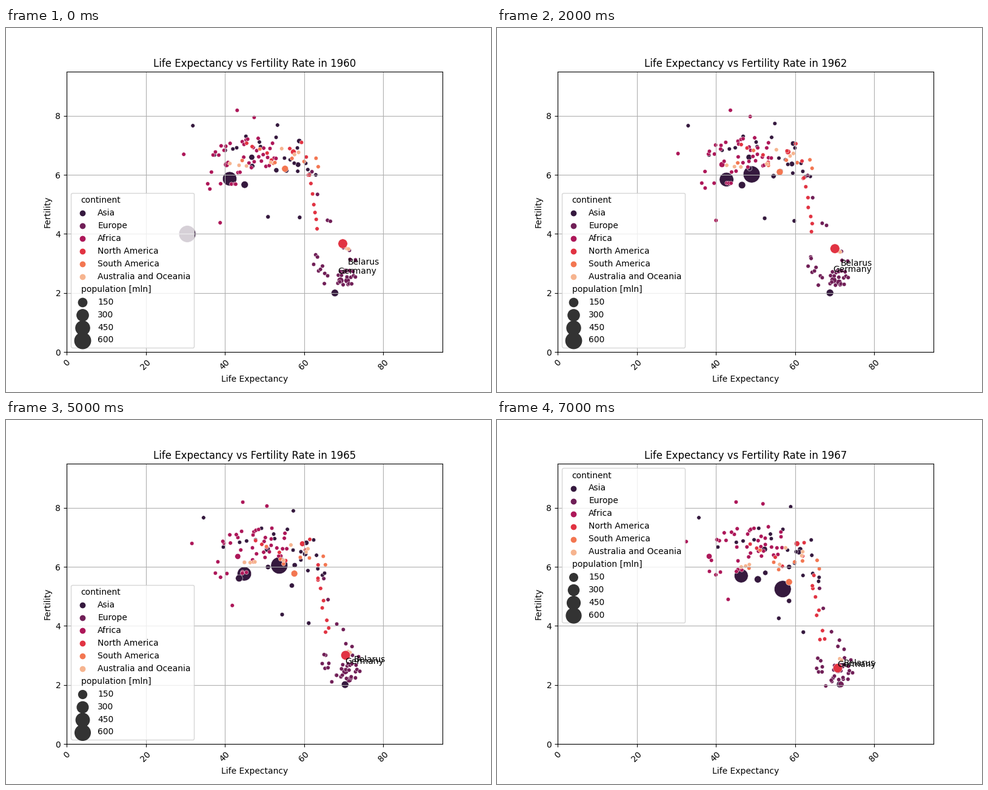
These frames come from a looping animation (800x600 px, 8000 ms). A matplotlib script:

```python
import numpy as np
import matplotlib.pyplot as plt
from matplotlib.animation import FuncAnimation
from matplotlib.offsetbox import VPacker

YEARS = 8
SMALL_POP = 4
COLORS = {
    "Asia": "#35193e",
    "Europe": "#701f57",
    "Africa": "#ad1759",
    "North America": "#e13342",
    "South America": "#f37651",
    "Australia and Oceania": "#f6b48f",
}

# Small countries strewn along a line: continent, count, the line's two ends,
# vertical spread, and the typical change over the whole period.
CLOUDS = [
    ("Asia", 12, (36, 6.9), (62, 6.8), 0.45, (5, 0)),
    ("Asia", 5, (57, 6.2), (64, 5.8), 0.3, (3.5, -0.4)),
    ("Europe", 18, (68.4, 2.5), (73, 2.5), 0.3, (1.2, -0.1)),
    ("Europe", 9, (62.3, 3.3), (66, 2.4), 0.3, (3, -0.4)),
    ("Europe", 4, (61.5, 6), (67.5, 3.9), 0.3, (3.5, -0.7)),
    ("Europe", 4, (69.5, 3.6), (73.6, 2.9), 0.2, (0.8, -0.2)),
    ("Africa", 17, (35.5, 6.2), (44, 6.5), 0.8, (3.6, 0.2)),
    ("Africa", 22, (44, 6.8), (53, 6.7), 0.55, (4, 0.1)),
    ("North America", 6, (43, 6.8), (60, 6.9), 0.4, (4.2, -0.4)),
    ("North America", 9, (60.5, 6.6), (63.5, 4.2), 0.2, (3.3, -0.7)),
    ("South America", 8, (44, 6.7), (66, 6.4), 0.25, (3, -0.4)),
    ("Australia and Oceania", 7, (39, 6.4), (61, 7.1), 0.4, (4, -0.3)),
    ("Australia and Oceania", 2, (70.6, 3.5), (71.4, 3.5), 0.05, (0.4, -0.5)),
]

# Countries that stand out: continent, population, start, total change.
NOTABLE = [
    ("Asia", 450, 41.2, 5.87, 5.2, -0.17),
    ("Asia", 93, 67.8, 2.0, 3.6, 0.02),
    ("Asia", 45, 46.8, 6.6, 5.5, 0),
    ("Asia", 28, 46.9, 6.3, 5.6, -0.5),
    ("Asia", 27, 58.8, 7.15, 2.5, -0.55),
    ("Asia", 30, 58.5, 6.35, 2.5, 0.15),
    ("Asia", 25, 53, 6.16, 5.5, -1.31),
    ("Asia", 27, 55.5, 6.15, 3, -0.15),
    ("Asia", SMALL_POP, 31.9, 7.67, 3.8, 0),
    ("Asia", SMALL_POP, 53.3, 7.69, 5.6, 0.35),
    ("Asia", 8, 50.9, 4.58, 5, -0.32),
    ("Asia", 8, 58.9, 4.56, 3.2, -0.77),
    ("Europe", 55, 70.9, 2.42, 0.7, -0.4),
    ("Europe", 73, 69.2, 2.42, 1.7, 0.08),
    ("Africa", SMALL_POP, 29.6, 6.7, 2.9, 0.16),
    ("Africa", SMALL_POP, 43.1, 8.19, 2, 0.01),
    ("Africa", SMALL_POP, 47.4, 7.95, 4.5, 0.19),
    ("Africa", SMALL_POP, 38.8, 4.38, 4.3, 0.52),
    ("South America", 72, 55.2, 6.21, 3.3, -0.72),
    ("North America", 38, 57.3, 6.78, 3.2, 0.01),
]
# Like the above, with a loss of life expectancy in certain years.
STRUCK = [
    (("Asia", 88, 45, 5.67, 5.6, -0.09), 5.4, (5, 6)),
    (("Africa", 45, 40.4, 6.35, 4, 0.01), 6.1, (7,)),
]
TOP = ("North America", 181, 69.8, 3.67, 1, -1.1)
GIANT_FERTILITY = (4.0, 3.28, 6.02, 7.41, 6.12, 6.05, 6.21, 5.25)

LABEL_YEARS = (0, 1, 3, 4, 6, 7)
LABELS = {
    "Belarus": ((71.05, 71.78, 71.2, 72.7, 72.55, 72.25),
                (2.96, 2.96, 2.9, 2.85, 2.72, 2.66)),
    "Germany": ((68.6, 69.4, 69.7, 70.3, 70.3, 70.6),
                (2.65, 2.69, 2.72, 2.72, 2.69, 2.61)),
}


def scatter_clouds():
    rng = np.random.default_rng(7)
    rows = []
    for name, n, start, end, spread, change in CLOUDS:
        along = (np.arange(n) + rng.random(n)) / n
        x = start[0] + along * (end[0] - start[0])
        y = start[1] + along * (end[1] - start[1])
        y += spread * rng.uniform(-1, 1, n)
        dx, dy = np.outer(change, rng.uniform(0.6, 1.4, n))
        rows += [(name, SMALL_POP, *row) for row in zip(x, y, dx, dy)]
    return rows


SMALL = scatter_clouds()


def move(row, i):
    """Life expectancy grows steadily, fertility changes ever faster."""
    name, pop, x, y, dx, dy = row
    t = i / (YEARS - 1)
    return x + dx * t, y + dy * t ** 1.5, pop * (1 + 0.1 * t), COLORS[name]


def giant(i):
    """The most populous country: famine at first, then steady recovery."""
    x = 30.5 + 2.5 * i if i < 2 else 45.9 + 1.57 * i
    return x, GIANT_FERTILITY[i], largest(i), COLORS["Asia"]


def largest(i):
    return 660 + 2 * i ** 2


def countries(i):
    rows = [giant(i)] + [move(row, i) for row in NOTABLE]
    for row, loss, years in STRUCK:
        x, *rest = move(row, i)
        rows.append((x - loss * (i in years), *rest))
    return rows + [move(row, i) for row in SMALL + [TOP]]


def area(pop, i):
    return 20 + 380 * np.asarray(pop) / largest(i)


def add_legend(i):
    def dot(label, color, size=36):
        return ax.scatter([], [], s=size, color=color, label=label)

    handles = [dot("continent", "w")]
    handles += [dot(name, color) for name, color in COLORS.items()]
    handles.append(dot("population [mln]", "w"))
    handles += [dot(str(p), "0.2", area(p, i)) for p in range(150, 601, 150)]
    loc = "upper left" if i == YEARS - 1 else "lower left"
    legend = ax.legend(handles=handles, loc=loc)
    # Subtitles have no marker, so they start at the left.
    rows = legend.findobj(VPacker)[0].get_children()
    for k in (0, len(COLORS) + 1):
        marker_box = rows[k].get_children()[0]
        marker_box.width = 0
        for artist in marker_box.get_children():
            artist.set_visible(False)


def draw(i):
    ax.clear()
    x, y, pop, color = zip(*countries(i))
    ax.scatter(x, y, s=area(pop, i), c=color, edgecolors="w", linewidths=0.37)
    for name, (xs, ys) in LABELS.items():
        ax.text(np.interp(i, LABEL_YEARS, xs),
                np.interp(i, LABEL_YEARS, ys), name)
    add_legend(i)
    ax.set(xlim=(0, 95), ylim=(0, 9.5),
           xticks=range(0, 81, 20), yticks=range(0, 9, 2),
           xlabel="Life Expectancy", ylabel="Fertility",
           title=f"Life Expectancy vs Fertility Rate in {1960 + i}")
    ax.tick_params(axis="x", rotation=45)
    ax.grid(True)
    return []


fig, ax = plt.subplots(figsize=(8, 6), dpi=100)
anim = FuncAnimation(fig, draw, frames=YEARS, init_func=lambda: draw(0),
                     interval=1000, repeat=True, repeat_delay=0)
plt.show()
```
